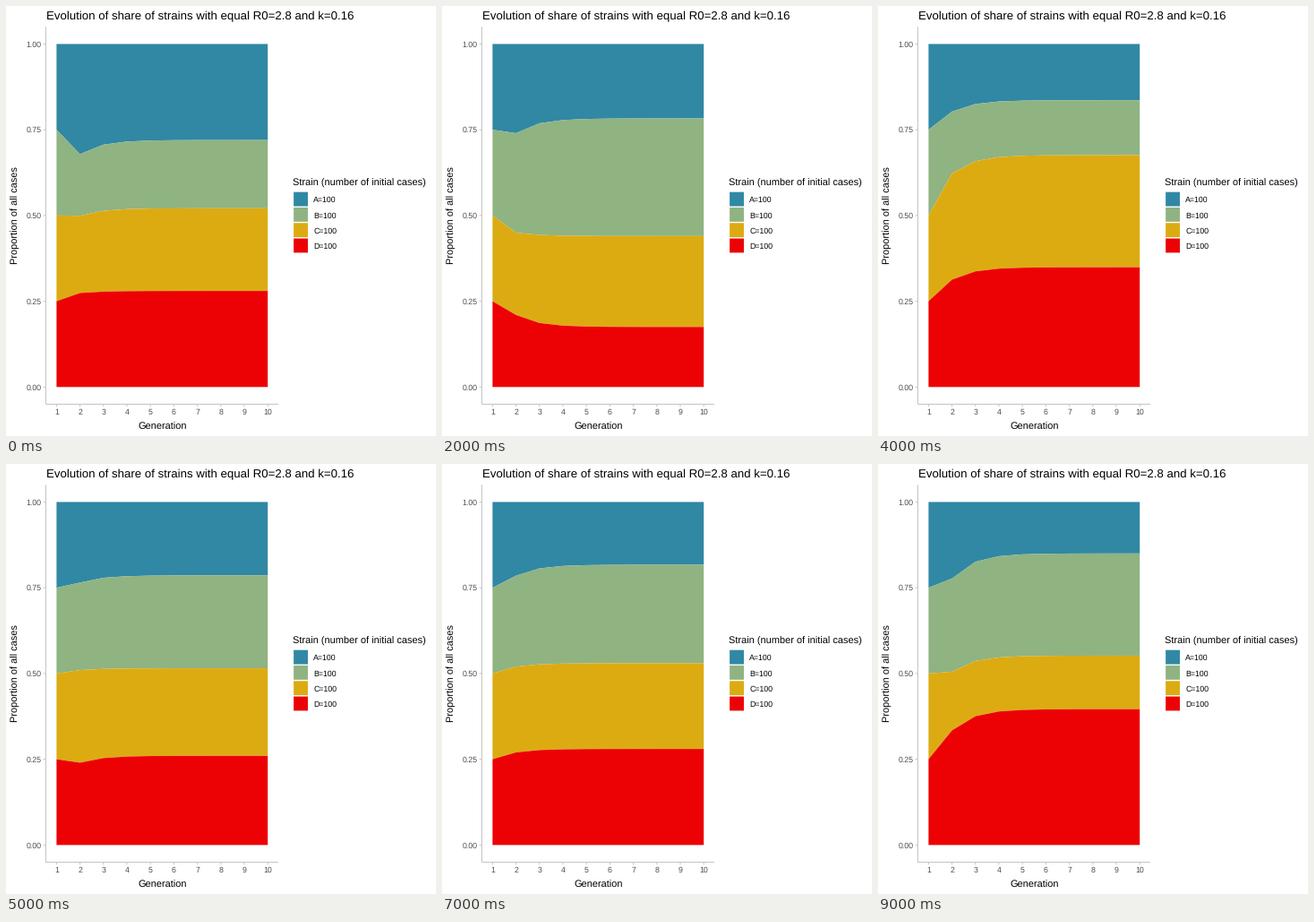
Animation of 480 by 480 pixels, one loop 10 s. Source, as a matplotlib script:

```python
import numpy as np
import matplotlib.pyplot as plt
from matplotlib.animation import FuncAnimation
from matplotlib.patches import Polygon, Rectangle

plt.rcParams.update({
    "font.family": "Liberation Sans",
    "text.hinting": "none",
    "toolbar": "None",
})

SIZE, DPI = 480, 72
LEFT, RIGHT, TOP, BOTTOM = 44.5, 304, 23.3, 444.5
X1, X10, Y0, Y1 = 56.4, 292.2, 425.3, 42.4
GREY, LABEL = "#c4c4c4", "#4d4d4d"
STRAINS = {"A": "#3088a4", "B": "#90b382", "C": "#dcab12", "D": "#ec0205"}

GENS = np.arange(1, 11)
START = (0.75, 0.50, 0.25)
SETTLE = 0.33  # part of the remaining gap left after each generation

# Per run: tops of B, C and D after the first jump, then where they settle
RUNS = [
    ((.679, .499, .274), (.720, .521, .280)),
    ((.677, .418, .248), (.760, .531, .358)),
    ((.740, .450, .210), (.783, .440, .175)),
    ((.677, .461, .219), (.684, .478, .193)),
    ((.803, .623, .313), (.836, .676, .349)),
    ((.765, .510, .240), (.786, .515, .260)),
    ((.714, .447, .303), (.755, .506, .382)),
    ((.785, .520, .270), (.817, .530, .280)),
    ((.627, .372, .244), (.574, .295, .210)),
    ((.777, .505, .334), (.850, .552, .396)),
]


def px(gen):
    return X1 + (X10 - X1) * (gen - 1) / 9


def py(share):
    return Y0 + (Y1 - Y0) * share


def share_curve(start, jump, end):
    """Jump in the second generation, then decay towards the final share."""
    settled = end + (jump - end) * SETTLE ** (GENS - 2.0)
    return np.where(GENS == 1, start, settled)


def edges(run):
    """Five stacked boundaries in pixels, from the top down."""
    inner = [share_curve(*keys) for keys in zip(START, *RUNS[run])]
    return [py(e) for e in (np.ones(10), *inner, np.zeros(10))]


def band(upper, lower):
    x = px(GENS)
    return np.column_stack([np.r_[x, x[::-1]], np.r_[upper, lower[::-1]]])


fig = plt.figure(figsize=(SIZE / DPI, SIZE / DPI), dpi=DPI, facecolor="white")
ax = fig.add_axes([0, 0, 1, 1])
ax.set(xlim=(0, SIZE), ylim=(SIZE, 0))
ax.axis("off")


def line(x0, y0, x1, y1):
    ax.plot([x0, x1], [y0, y1], color=GREY, lw=1, solid_capstyle="butt", snap=False)


def label(x, y, text, size, color="black", **kw):
    ax.text(x, y, text, size=size, color=color, va="baseline", **kw)


line(LEFT, TOP, LEFT, BOTTOM)
line(LEFT, BOTTOM, RIGHT, BOTTOM)
for share in np.linspace(0, 1, 5):
    y = py(share)
    line(LEFT - 2.75, y, LEFT, y)
    label(39.7, y + 3.2, f"{share:.2f}", 8.8, LABEL, ha="right")
for gen in GENS:
    x = px(gen)
    line(x, BOTTOM, x, BOTTOM + 2.75)
    label(x, 456, str(gen), 8.8, LABEL, ha="center")

label(44.6, 15, "Evolution of share of strains with equal R0=2.8 and k=0.16", 13.2)
label((LEFT + RIGHT) / 2, 473, "Generation", 11, ha="center")
label(13.3, (TOP + BOTTOM) / 2, "Proportion of all cases", 11,
      ha="center", rotation=90, rotation_mode="anchor")

label(320.4, 201, "Strain (number of initial cases)", 11)
for i, (name, color) in enumerate(STRAINS.items()):
    mid = 215.6 + 17.28 * i
    ax.add_patch(Rectangle((321.1, mid - 7.93), 15.86, 15.86, fc=color, lw=0, snap=False))
    label(343.2, mid + 3.6, f"{name}=100", 8.8)

bands = [ax.add_patch(Polygon(np.zeros((3, 2)), fc=c, lw=0, zorder=3))
         for c in STRAINS.values()]


def update(run):
    e = edges(run)
    for patch, upper, lower in zip(bands, e, e[1:]):
        patch.set_xy(band(upper, lower))
    return bands


anim = FuncAnimation(fig, update, frames=len(RUNS), interval=1000, repeat=True,
                     repeat_delay=0, init_func=lambda: update(0), blit=False)
plt.show()
```
